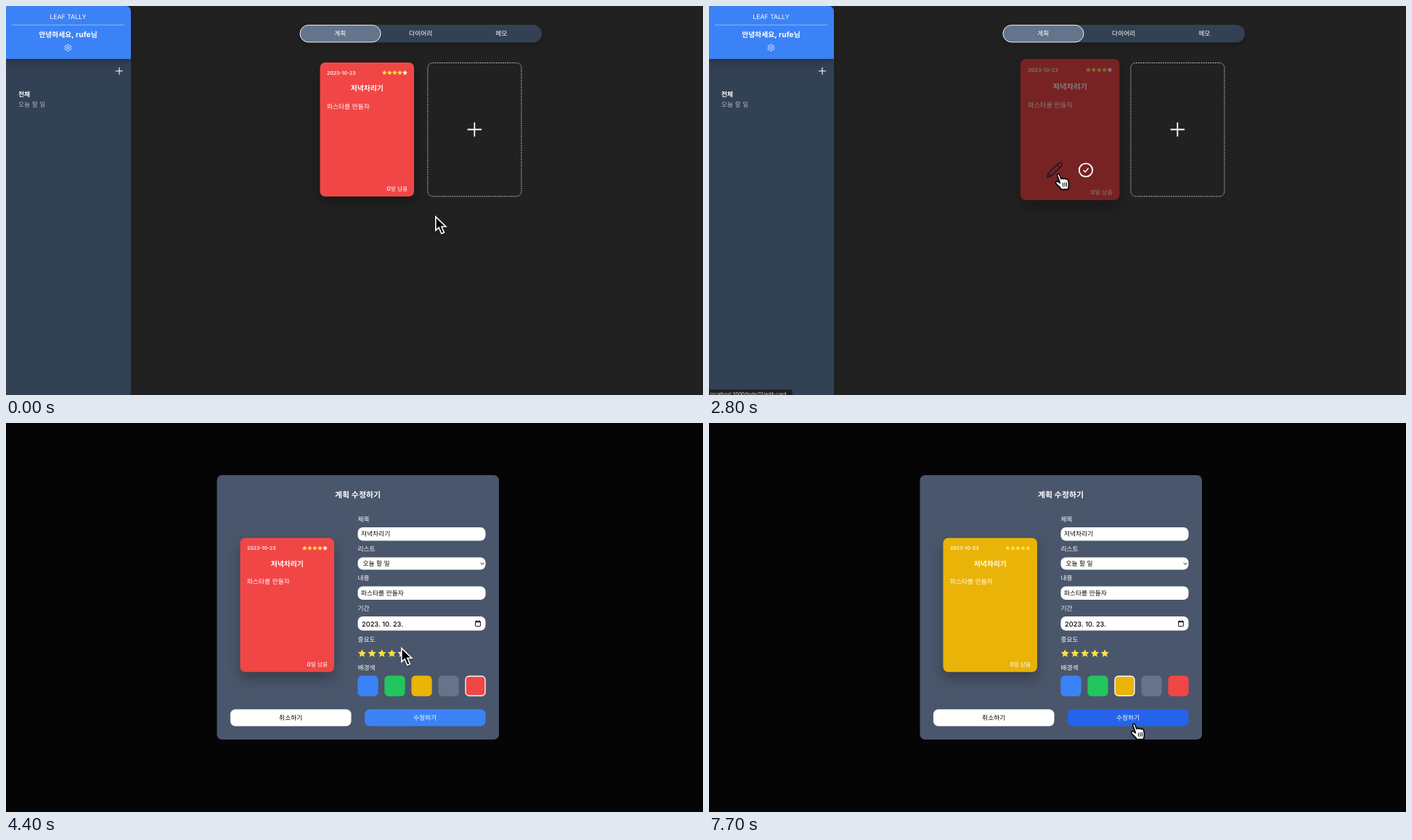
These frames come from a looping animation (960x537 px, 8 s). An HTML page:

```html
<!DOCTYPE html>
<html lang="ko">
<head>
<meta charset="utf-8">
<title>Planner</title>
<style>
html, body { margin: 0; width: 100%; height: 100%; overflow: hidden; background: #050505; }
svg { display: block; width: 100%; height: 100%; font-family: Inter, 'Noto Sans CJK KR', sans-serif; }
text { white-space: pre; text-rendering: geometricPrecision; }
.soft { filter: drop-shadow(0 5px 5px rgba(0,0,0,.18)); }
.deep { filter: drop-shadow(0 9px 9px rgba(0,0,0,.27)); }
</style>
</head>
<body>
<svg id="stage" viewBox="0 0 960 537" preserveAspectRatio="none"></svg>
<script>
const LOOP = 8000, STEP = 100;
const BLUE = '#3b82f6', YELLOW = '#eab308', RED = '#f14646', STAR = '#fde047', WHITE = '#fff';
const stage = document.getElementById('stage');

function add(parent, tag, attrs) {
  const el = document.createElementNS('http://www.w3.org/2000/svg', tag);
  for (const k in attrs) el.setAttribute(k, attrs[k]);
  return parent.appendChild(el);
}
const group = (parent, attrs) => add(parent, 'g', attrs);
const box = (parent, x, y, width, height, rx, fill, more) =>
  add(parent, 'rect', { x, y, width, height, rx, fill, ...more });
const line = (parent, d, stroke, width, more) =>
  add(parent, 'path', { d, fill: 'none', stroke, 'stroke-width': width, ...more });

// Hangul runs are set slightly smaller than the Latin runs beside them.
function label(parent, x, y, size, str, more) {
  const el = add(parent, 'text', { x, y, fill: WHITE, 'font-weight': 400, ...more });
  for (const run of str.match(/[가-힣]+|[^가-힣]+/g)) {
    const hangul = run >= '가';
    add(el, 'tspan', { 'font-size': hangul ? size * .945 : size }).textContent = run;
  }
  return el;
}
const MID = { 'text-anchor': 'middle' }, END = { 'text-anchor': 'end' };

function ring(cx, cy, n, radius) {
  return Array.from({ length: n }, (_, i) => {
    const a = i / n * 2 * Math.PI - Math.PI / 2, r = radius(i, a);
    return (cx + r * Math.cos(a)).toFixed(2) + ',' + (cy + r * Math.sin(a)).toFixed(2);
  }).join(' ');
}
function stars(parent, x, y, gap, r) {
  return [0, 1, 2, 3, 4].map(i => add(parent, 'polygon', {
    points: ring(x + i * gap, y, 10, k => k % 2 ? r * .47 : r),
    fill: i < 4 ? STAR : WHITE, stroke: 'none'
  }));
}
function card(parent) {
  const g = group(parent);
  const face = box(group(g, { class: 'deep' }), 432.5, 78, 129.5, 185, 7, RED);
  label(g, 442, 94.6, 6.94, '2023-10-23', { 'font-weight': 500 });
  const marks = stars(g, 521.3, 92.2, 7.05, 3.6);
  label(g, 497.3, 117.2, 10.4, '저녁차리기', { ...MID, 'font-weight': 700 });
  label(g, 442, 141.5, 9.25, '파스타를 만들자', { 'font-weight': 500 });
  label(g, 553, 255.4, 8.1, '0일 남음', { ...END, 'font-weight': 500 });
  return { g, face, marks };
}
function plus(parent, x, y, r, width) {
  line(parent, `M${x - r} ${y}h${2 * r}M${x} ${y - r}v${2 * r}`, WHITE, width);
}

// Board page
const board = group(stage);
box(board, 0, 0, 960, 537, 0, '#212121');
box(board, -10, 0, 182, 547, 7, '#334155');
box(group(board, { class: 'soft' }), -10, 0, 182, 73, 7, BLUE);
box(board, 0, 60, 172, 13, 0, BLUE);
label(board, 85.5, 18, 8.75, 'LEAF TALLY', MID);
line(board, 'M8 26.2H163', '#a9c8fb', .8);
label(board, 85.5, 42.6, 10.4, '안녕하세요, rufe님', { ...MID, 'font-weight': 700 });
add(board, 'polygon', {
  points: ring(85.5, 57.6, 48, (i, a) => 4.1 + .6 * Math.cos(6 * (a + Math.PI / 2))),
  fill: 'none', stroke: WHITE, 'stroke-width': .9
});
add(board, 'circle', { cx: 85.5, cy: 57.6, r: 1.6, fill: 'none', stroke: WHITE, 'stroke-width': .9 });
plus(board, 156, 89.8, 5, 1.1);
label(board, 17, 125.2, 9.25, '전체', { 'font-weight': 700 });
label(board, 17, 139.2, 9.25, '오늘 할 일', { fill: '#b0b7c1' });

box(group(board, { class: 'soft' }), 404.5, 26, 333.5, 24.3, 12.1, '#334155');
box(board, 405, 26.4, 111, 23.5, 11.7, '#64748b', { stroke: WHITE, 'stroke-width': .9 });
['계획', '다이어리', '메모'].forEach((s, i) =>
  label(board, 460.2 + i * 111, 41.2, 9.25, s, { ...MID, 'font-weight': 500 }));

const blank = group(board);
box(blank, 580.9, 78.5, 129, 184.3, 7, 'none',
  { stroke: '#e4e4e4', 'stroke-width': .8, 'stroke-dasharray': '1.9 1.2' });
plus(blank, 645.3, 170.5, 9.7, 1.8);

const plan = card(board);
const shade = box(plan.g, 432.5, 78, 129.5, 185, 7, '#000');
const tools = group(board, { 'stroke-linejoin': 'round', 'stroke-linecap': 'round' });
const pencil = line(tools, 'M465.6 236.5L467 231.3L481.4 217Q483.5 215.5 485.3 217.2Q487 219 485.5 221L471 235.1ZM479.5 219L483.5 223M467 231.3L471 235.1', WHITE, 1.5);
add(tools, 'circle', { cx: 519, cy: 226.5, r: 9.2, fill: 'none', stroke: WHITE, 'stroke-width': 1.8 });
line(tools, 'M516 227l2.2 2.3l4-5', WHITE, 1.5);

// Edit page
const edit = group(stage);
box(edit, 290.5, 72, 388.5, 365, 7, '#4a566b');
label(edit, 484.5, 103, 11.55, '계획 수정하기', { ...MID, 'font-weight': 700 });
const preview = card(group(edit, { transform: 'translate(-110 80.7)' }));
[['제목', 135.6], ['리스트', 177.3], ['내용', 217.3], ['기간', 258.7], ['중요도', 301.6], ['배경색', 340.9]]
  .forEach(([s, y]) => label(edit, 484.5, y, 9.25, s, { 'font-weight': 500 }));
[[144, 18.5, 489, 156.4, '저녁차리기'], [185.5, 17, 491.5, 197.4, '오늘 할 일'],
 [225.5, 18.5, 489, 237.9, '파스타를 만들자'], [267, 19.5, 490, 280.5, '2023. 10. 23.']]
  .forEach(([y, h, x, base, s]) => {
    box(edit, 484.5, y, 176, h, 7, WHITE);
    label(edit, x, base, 9.25, s, { fill: '#000', 'font-weight': 500 });
  });
line(edit, 'M653.6 193l2.4 2.4l2.4-2.4', '#111', 1);
box(edit, 646.6, 274, 6.8, 6.6, .6, 'none', { stroke: '#111', 'stroke-width': 1 });
line(edit, 'M646.2 274.6h7.6M648 272.6v1.4M652 272.6v1.4', '#111', 1.5);
const rating = stars(edit, 490.4, 318.3, 13.7, 5.9);
const swatches = [BLUE, '#22c55e', YELLOW, '#64748b', RED].map((c, i) =>
  box(edit, 485 + i * 37, 349.5, 27, 27, 4.8, c, { 'stroke-width': 1.3 }));
box(edit, 309, 395.3, 166.5, 23.2, 7, WHITE);
label(edit, 392.2, 410.2, 9.25, '취소하기', { ...MID, fill: '#000', 'font-weight': 500 });
const submit = box(edit, 494, 395.3, 166.5, 23.2, 7, BLUE);
label(edit, 577, 410.2, 9.25, '수정하기', { ...MID, 'font-weight': 500 });

// Browser status line
function status(width, str) {
  const g = group(stage);
  box(g, -5, 529.5, width + 5, 20, 2.5, '#202124');
  label(g, 1.8, 537.8, 6.7, str, { fill: '#e3e3e3' });
  return g;
}
const link = status(115, 'localhost:3000/todo/13/edit-card');
const waiting = status(322, 'localhost의 응답을 기다리는 중');

// Pointer
const pointer = group(stage, { style: 'filter:drop-shadow(0 1px 1px rgba(0,0,0,.35))' });
const arrow = add(pointer, 'path', {
  d: 'M.8 2V20.7L5.2 16.8L8.8 25.2L12.4 23.6L8.9 15.5H14.8Z',
  fill: '#000', stroke: WHITE, 'stroke-width': 1.6
});
const hand = group(pointer, { transform: 'translate(3 6.3)', stroke: '#000', 'stroke-linecap': 'round' });
add(hand, 'path', {
  d: 'M6.8 12L4 4C3.2 1.4 6 .6 6.8 2.8L9 8.8C9.4 7.2 11.6 7 12.2 8.6C13 7.2 15 7.4 15.4 9C16.6 8 18.2 8.6 18.5 10.2C19.4 13 20 15 19.3 18L18.6 22.5L9.6 23C8 20 5 18 2.6 15.4C.4 13 2.4 11 4.4 12.2L7.4 14.2Z',
  fill: WHITE, 'stroke-width': 1.5, 'stroke-linejoin': 'round'
});
line(hand, 'M11.2 14l.6 5M13.8 13.7l.4 5M16.3 13.4l.2 5', '#000', 1);

// Pointer path: time, x, y
const PATH = [
  [400, 591, 289], [500, 590, 280], [600, 588, 255], [700, 583, 228], [800, 560, 208],
  [900, 534, 189], [1000, 526, 184], [1500, 526, 183.3], [1600, 518, 190], [1700, 500, 203],
  [1800, 484, 215], [1900, 476, 222], [2000, 473, 224], [3600, 473, 224], [3700, 480, 232],
  [3800, 508, 268], [3900, 548, 322], [4000, 568, 346], [4100, 549, 318], [4300, 549, 318],
  [4400, 544, 309], [4800, 548.5, 318], [5200, 548.5, 318], [6100, 568.7, 361],
  [6900, 568.7, 361], [7100, 570, 369], [7300, 574.5, 396], [7500, 577, 407.5]
];
function place(t) {
  const i = PATH.findIndex(p => p[0] >= t);
  if (i < 0) return PATH[PATH.length - 1].slice(1);
  if (i === 0) return PATH[0].slice(1);
  const [t0, x0, y0] = PATH[i - 1], [t1, x1, y1] = PATH[i], k = (t - t0) / (t1 - t0);
  return [x0 + (x1 - x0) * k, y0 + (y1 - y0) * k];
}
function ramp(t, a, b) {
  const k = Math.min(1, Math.max(0, (t - a) / (b - a)));
  return k * k * (3 - 2 * k);
}
const show = (el, on) => el.setAttribute('visibility', on ? 'visible' : 'hidden');
const grow = (el, x, y, k) =>
  el.setAttribute('transform', `translate(${x} ${y}) scale(${1 + .05 * k}) translate(${-x} ${-y})`);

function draw(t) {
  const over = ramp(t, 700, 950), picked = t >= 6200, rated = t >= 4600;
  const onPencil = t >= 1800 && t < 2900, onSubmit = t >= 7300;

  board.style.display = t < 2900 ? '' : 'none';
  edit.style.display = t >= 3200 ? '' : 'none';
  grow(plan.g, 497.25, 170.5, over);
  grow(blank, 645.4, 170.6, ramp(t, 500, 650) - ramp(t, 700, 850));
  shade.setAttribute('opacity', over * .5);
  tools.setAttribute('opacity', over);
  pencil.setAttribute('stroke', onPencil ? '#141b33' : WHITE);

  for (const set of [preview.marks, rating]) set[4].setAttribute('fill', rated ? STAR : WHITE);
  preview.face.setAttribute('fill', picked ? YELLOW : RED);
  swatches.forEach((s, i) => s.setAttribute('stroke', i === (picked ? 2 : 4) ? WHITE : s.getAttribute('fill')));
  submit.setAttribute('fill', onSubmit ? '#2563eb' : BLUE);

  link.setAttribute('opacity', t < 2900 ? ramp(t, 2100, 2400) : 0);
  waiting.setAttribute('opacity', t < 2900 ? 0 : 1 - ramp(t, 3100, 3400));

  const [x, y] = place(t);
  pointer.setAttribute('transform', `translate(${x} ${y})`);
  show(hand, onPencil || onSubmit);
  show(arrow, !onPencil && !onSubmit);
}

const start = performance.now();
function tick() {
  const t = (performance.now() - start) % LOOP;
  draw(Math.floor(t / STEP) * STEP);
  requestAnimationFrame(tick);
}
tick();
</script>
</body>
</html>
```
